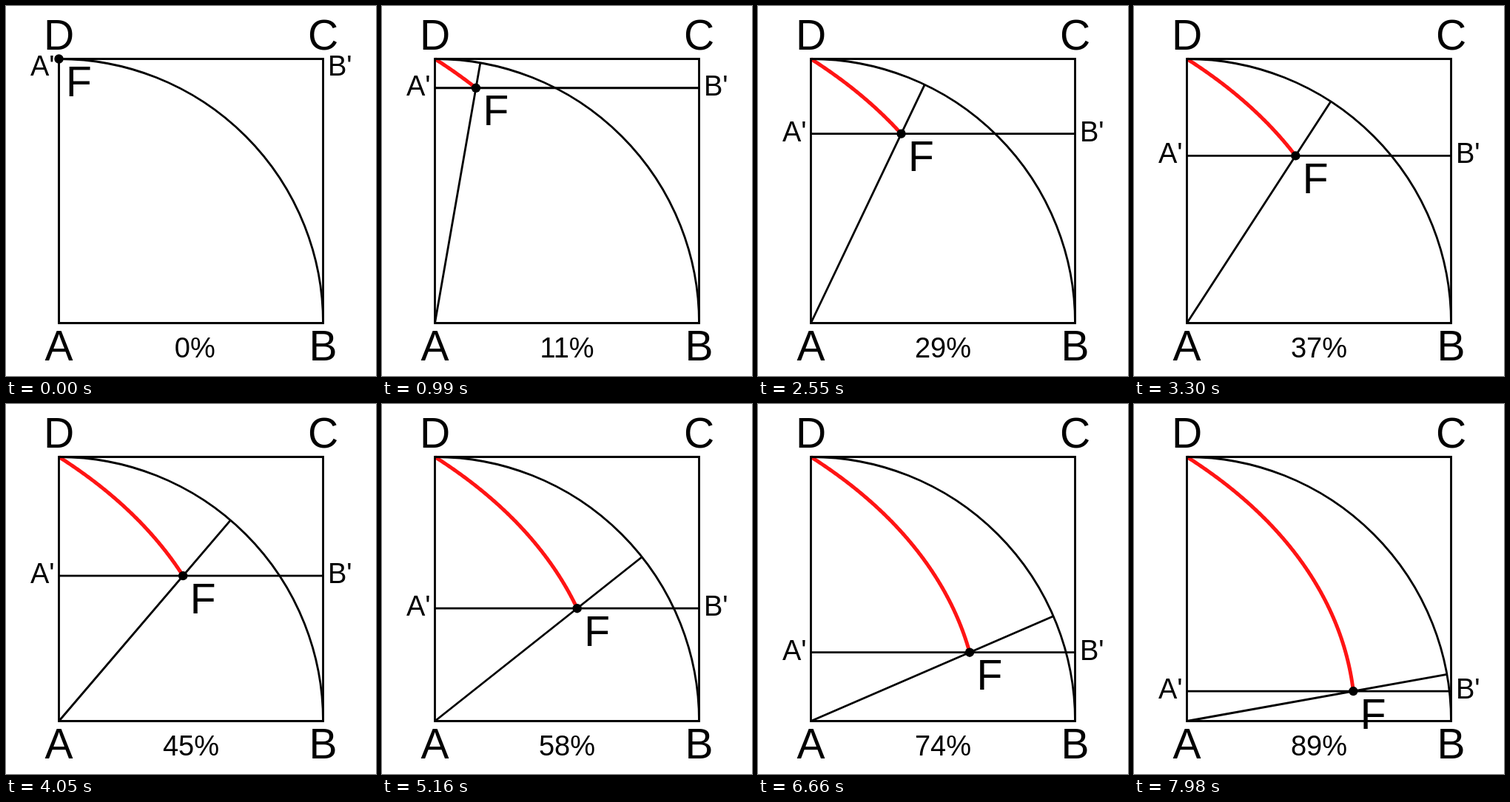
An HTML page for the animation above (8 s loop, 500 by 500 pixels).

```html
<!DOCTYPE html>
<html lang="en">
<head>
<meta charset="utf-8">
<title>Quadratrix</title>
<style>
  html, body { margin: 0; width: 100%; height: 100%; overflow: hidden; background: #fff; }
  svg { display: block; width: 100%; height: 100%; }
  text { font-family: "Liberation Sans", Arial, sans-serif; font-size: 38px; }
  .big { font-size: 57px; }
  .mid { text-anchor: middle; }
  .line { fill: none; stroke: #000; stroke-width: 2.8; }
  #trace { fill: none; stroke: #ff1414; stroke-width: 5; }
</style>
</head>
<body>
<svg viewBox="0 0 500 500">
  <path id="trace"/>
  <path class="line" d="M71.5 71.5H428.5V428.5H71.5Z"/>
  <path class="line" d="M71.5 71.5A357 357 0 0 1 428.5 428.5"/>
  <path class="line" id="moving"/>
  <circle id="dot" r="6.2"/>
  <text class="big mid" x="71.5" y="479">A</text>
  <text class="big mid" x="428.5" y="479">B</text>
  <text class="big mid" x="428.5" y="59">C</text>
  <text class="big mid" x="71.5" y="59">D</text>
  <text class="big" id="pointLabel">F</text>
  <text id="leftLabel" x="33">A'</text>
  <text id="rightLabel" x="435">B'</text>
  <text class="mid" id="percent" x="250" y="475"></text>
</svg>
<script>
const LOOP = 8000, STEP_MS = 30, STEPS = 300;
const LEFT = 71.5, TOP = 71.5, SIDE = 357, RIGHT = LEFT + SIDE, BOTTOM = TOP + SIDE;
const el = id => document.getElementById(id);
const set = (id, attrs) => {
  for (const name in attrs) el(id).setAttribute(name, attrs[name]);
};

// The point where the sinking line meets the turning radius.
function quadratrix(p) {
  return [LEFT + SIDE * (1 - p) * Math.tan(p * Math.PI / 2), TOP + SIDE * p];
}

function draw(step) {
  const p = step / STEPS, angle = p * Math.PI / 2;
  const [x, y] = quadratrix(p);
  const tipX = LEFT + SIDE * Math.sin(angle), tipY = BOTTOM - SIDE * Math.cos(angle);

  const points = Array.from({ length: step + 1 }, (_, i) => quadratrix(i / STEPS));
  set("trace", { d: "M" + points.join("L") });
  set("moving", { d: `M${LEFT} ${y}H${RIGHT}M${LEFT} ${BOTTOM}L${tipX} ${tipY}` });
  set("dot", { cx: x, cy: y });
  set("pointLabel", { x: x + 9.5, y: y + 50.5 });

  // Side labels stay clear of the corner letters.
  const labelY = Math.max(y + 10, 94);
  set("leftLabel", { y: labelY });
  set("rightLabel", { y: labelY });
  el("percent").textContent = `${Math.ceil(step * 100 / STEPS)}%`.padStart(3, "\u00a0");
}

const start = performance.now();
function tick() {
  draw(Math.floor((performance.now() - start) % LOOP / STEP_MS));
  requestAnimationFrame(tick);
}
tick();
</script>
</body>
</html>
```
